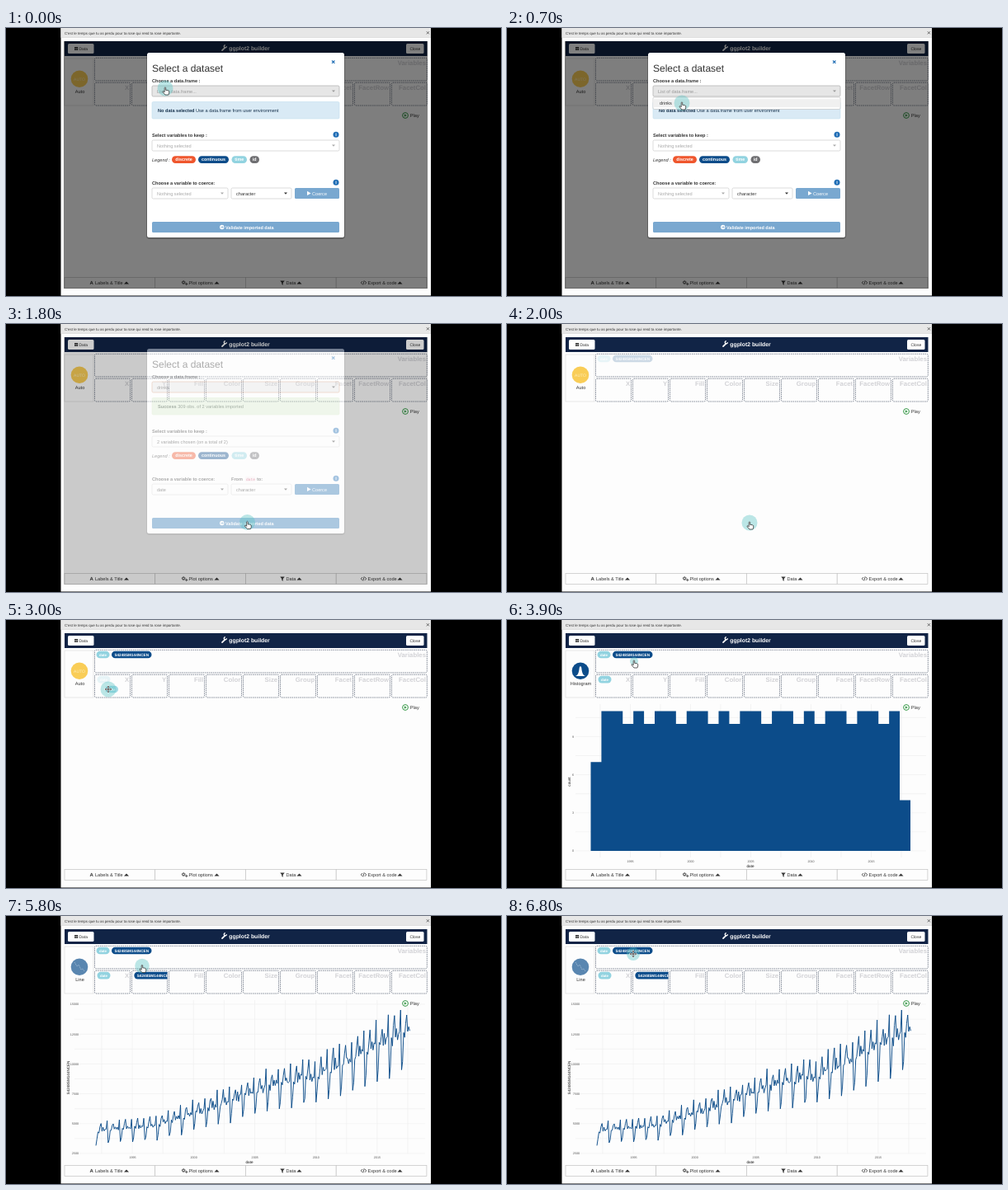
Recreate the animation shown at these times as an HTML page. Size 600 by 325 pixels, loop 6.9 s.

```html
<!DOCTYPE html>
<html lang="en">
<head>
<meta charset="utf-8">
<title>Chart builder</title>
<style>
html, body { margin: 0; width: 100%; height: 100%; overflow: hidden; background: #000; }
svg { display: block; width: 600px; height: 325px; }
text { font-family: "Liberation Sans", Arial, sans-serif; font-size: 5.6px; fill: #333; text-rendering: geometricPrecision; white-space: pre; }
</style>
</head>
<body>
<svg id="stage" viewBox="0 0 600 325" xmlns="http://www.w3.org/2000/svg"></svg>
<script>
const LOOP = 6900, STEP = 100;
const NAVY = '#0c4c8a', TEAL = '#92d3e0', BLUE = '#337ab7', HEADER = '#112446', PAPER = '#fdfdfd';
const SERIES = 'S4248SM144NCEN';

const rect = (x, y, w, h, fill, extra = '') =>
  `<rect x="${x}" y="${y}" width="${w}" height="${h}" fill="${fill}" ${extra}/>`;
const text = (x, y, s, extra = '') => `<text x="${x}" y="${y}" ${extra}>${s}</text>`;
const path = (d, fill, extra = '') => `<path d="${d}" fill="${fill}" ${extra}/>`;
const circle = (x, y, r, fill, extra = '') => `<circle cx="${x}" cy="${y}" r="${r}" fill="${fill}" ${extra}/>`;
const group = (id, body, extra = '') => `<g id="${id}" ${extra}>${body}</g>`;
const bold = 'font-weight="bold"', mid = 'text-anchor="middle"', end = 'text-anchor="end"';
const white = 'style="fill:#fff"';
const size = (px, fill = '#333') => `style="font-size:${px}px;fill:${fill}"`;

const pill = (x, y, w, label, fill, px = 4.7) =>
  rect(x, y, w, 8.6, fill, 'rx="4.3"') + text(x + w / 2, y + 6, label, `${bold} ${mid} ${size(px, '#fff')}`);
const datePill = (x, y) => pill(x, y, 16, 'date', TEAL, 4.4);
const seriesPill = (x, y) => pill(x, y, 48.5, SERIES, NAVY);
const caret = (x, y, up, fill = '#333') =>
  path(up ? `M${x - 3} ${y + 1.5}h6l-3-3z` : `M${x - 2} ${y - 1}h4l-2 2.2z`, fill);
const select = (x, y, w, label, ink, fill = '#fff', border = '#ccc') =>
  rect(x, y, w, 13, fill, `stroke="${border}" stroke-width=".7" rx="1.5"`) +
  text(x + 6, y + 8.6, label, `style="fill:${ink}"`) + caret(x + w - 7, y + 6.5, false, ink);
const gear = (x, y, r) => circle(x, y, r, 'none', 'stroke="#333" stroke-width="1"') +
  circle(x, y, r + .7, 'none', 'stroke="#333" stroke-width=".6" stroke-dasharray=".8 .9"');

function page() {
  const zones = ['X', 'Y', 'Fill', 'Color', 'Size', 'Group', 'Facet', 'FacetRow', 'FacetCol'];
  const dash = 'stroke="#6b7484" stroke-width=".8" stroke-dasharray="1.6 .9" rx="1.5"';
  const zone = (x, y, w, h, label) => rect(x, y, w, h, PAPER, dash) +
    text(x + w - 1.3, y + 8.4, label, `${bold} ${end} ${size(7.8, '#d2d2d6')}`);
  const tabs = [71, 180.7, 290.5, 400.2].map(x =>
    rect(x, 302.4, 109.7, 13, PAPER, 'stroke="#c4c4c4" stroke-width=".7"')).join('');
  return rect(66.5, 0, 448.5, 324.5, PAPER) +
    rect(66.5, 0, 448.5, 11.5, '#e7e7e7') + rect(66.5, 11.3, 448.5, .5, '#ccc') +
    text(71, 8, 'C\'est le temps que tu as perdu pour ta rose qui rend ta rose importante.', size(4.46)) +
    path('M509.8 4.2l3.2 3.2m0-3.2l-3.2 3.2', 'none', 'stroke="#333" stroke-width=".7"') +
    rect(71, 16, 439.5, 18, HEADER) +
    rect(75, 19, 31.5, 12, '#fff', 'rx="1.5"') + rect(485, 19, 21.5, 12, '#fff', 'rx="1.5"') +
    rect(83, 23, 4.2, 4, '#333') + path('M83 24.5h4.2m-4.2 1.3h4.2m-2.1-1.8v3', 'none', 'stroke="#fff" stroke-width=".3"') +
    text(88.5, 27, 'Data', size(5)) + text(495.8, 27, 'Close', `${mid} ${size(5)}`) +
    path('M262 27.2l3.6-3.6', 'none', 'stroke="#fff" stroke-width="1.7" stroke-linecap="round"') +
    path('M267.4 22.2a1.6 1.6 0 1 1-1.6-1.5', 'none', 'stroke="#fff" stroke-width="1.3"') +
    text(270.3, 27, 'ggplot2 builder', `${bold} ${size(6.85, '#fff')}`) +
    rect(71, 37, 35, 57, PAPER, 'stroke="#ddd" stroke-width=".7"') +
    zone(107.5, 36.3, 402.8, 27.6, 'Variables') +
    zones.map((z, i) => zone(107.5 + i * 45, 66.2, i === 8 ? 42.8 : 43, 27.8, z)).join('') +
    tabs +
    text(101.5, 311, 'A', `${bold} ${size(6)}`) + text(108, 311, 'Labels &amp; Title') + caret(146, 309, true) +
    gear(215.2, 308.5, 1.4) + gear(218.7, 310.4, .6) + text(221.5, 311, 'Plot options') + caret(255.5, 309, true) +
    path('M332.3 306.5h5.4l-2 2.6v2.6l-1.4-1v-1.6z', '#333') + text(339.5, 311, 'Data') + caret(355.5, 309, true) +
    path('M432 307l-1.7 1.9l1.7 1.9m3-3.8l1.7 1.9l-1.7 1.9m-.8-4.6l-1.4 5.2', 'none', 'stroke="#333" stroke-width=".8"') +
    text(438.5, 311, 'Export &amp; code') + caret(477.5, 309, true);
}

function chartIcons() {
  const label = s => text(89.5, 79.3, s, mid);
  return group('iconAuto', circle(89, 61.7, 10.3, '#f9cd57') + text(89, 63.7, 'AUTO', `${mid} ${size(5, '#fdeebf')}`) + label('Auto')) +
    group('iconHist', circle(89, 61.7, 10.3, NAVY) + path('M82.8 68c4-1 4.4-6 5-10.5q1.2-3 2.4 0c.6 4.5 1 9.5 5 10.5z', '#fff') + label('Histogram')) +
    group('iconLine', circle(89, 61.7, 10.3, '#5986b0') +
      path('M83 56l3 5l2-2l3 6l2-1l2 3', 'none', 'stroke="#a9c2d8" stroke-width=".7" stroke-dasharray="1.4 .6"') + label('Line'));
}

function grid(xs, ys, top, bottom, yearTick, yLabel) {
  const lines = xs.map(x => `M${x} ${top}V${bottom}`).join('') + ys.map(y => `M83 ${y}H508`).join('');
  return rect(72, 96, 437, 204, PAPER) + path(lines, 'none', 'stroke="#ededed" stroke-width=".6"') +
    [1995, 2000, 2005, 2010, 2015].map((y, i) => text(yearTick(i), 293.8, y, `${mid} ${size(3.7, '#555')}`)).join('') +
    text(295, 299.5, 'date', `${mid} ${size(4.6, '#111')}`) +
    text(0, 0, yLabel, `${mid} ${size(4.6, '#111')} transform="translate(76.5 196) rotate(-90)"`);
}
const spread = (start, gap, n) => Array.from({ length: n }, (_, i) => start + i * gap);

function histogram() {
  const unit = 15.4, width = 387.5 / 30, dips = [3, 5, 8, 11, 13, 16, 19, 21, 24, 27];
  const count = i => i === 0 ? 7 : i === 29 ? 4 : dips.includes(i) ? 10 : 11;
  let d = 'M101.5 280';
  for (let i = 0; i < 30; i++) d += `V${280 - count(i) * unit}H${101.5 + (i + 1) * width}`;
  return grid(spread(113, 36.5, 11), spread(280, -23.1, 8), 102, 288, i => 149.5 + i * 73, 'count') +
    [0, 3, 6, 9].map(v => text(81, 281.3 - v * unit, v, `${end} ${size(3.7, '#555')}`)).join('') +
    path(d + 'V280z', NAVY);
}

function lineChart() {
  const season = [.75, .83, 1, .98, 1.07, 1.14, 1, 1.05, .98, 1.02, 1.01, 1.17];
  const trend = [[1992, 4350], [1997, 4850], [2001, 6200], [2007, 8350], [2010, 9000], [2015, 11400], [2018, 12900]];
  let seed = 7;
  const noise = () => (seed = seed * 16807 % 2147483647) / 2147483647 - .5;
  let d = '';
  for (let m = 0; m < 309; m++) {
    const v = sample(trend, 1992 + m / 12)[0] * season[m % 12] * (1 + noise() * .06);
    d += `${m ? 'L' : 'M'}${(109 + m * 14.82 / 12).toFixed(1)} ${(288 - (v - 2500) * .01448).toFixed(1)}`;
  }
  return grid(spread(116, 37.1, 11), spread(288, -18.1, 11), 102, 288, i => 153.5 + i * 74.1, SERIES) +
    spread(2500, 2500, 6).map((v, i) => text(88, 289.3 - i * 36.2, v, `${end} ${size(3.7, '#555')}`)).join('') +
    path(d, 'none', `stroke="${NAVY}" stroke-width=".95" stroke-linejoin="round"`);
}

function modal() {
  const title = (y, s) => text(177, y, s, bold);
  const info = y => circle(400, y, 3.5, '#1f6db5') + text(400, y + 2, 'i', `${bold} ${mid} ${white}`);
  const buttons = rect(350, 194, 54, 13, BLUE, 'rx="1.5"') + path('M365 197.7v5.4l4.6-2.7z', '#fff') +
    text(371, 202.6, 'Coerce', white) + rect(177, 235, 227, 13, BLUE, 'rx="1.5"') +
    circle(261.8, 241.5, 2.7, '#fff') + path('M260.2 241.5h3m-1.2-1.3l1.3 1.3l-1.3 1.3', 'none', `stroke="${BLUE}" stroke-width=".7"`) +
    text(266, 243.6, 'Validate imported data', `${bold} ${size(5.5, '#fff')}`);
  const alert = (fill, border, ink, strong, rest) =>
    rect(177, 89.5, 227, 20.5, fill, `stroke="${border}" stroke-width=".6" rx="1.5"`) +
    `<text x="184" y="102" style="fill:${ink}"><tspan ${bold}>${strong}</tspan> ${rest}</text>`;
  return rect(170, 30, 241, 226, '#000', 'opacity=".25" rx="4"') + rect(171, 30, 239, 224, '#fff', 'rx="2.5"') +
    path('M395 39.5l3.4 3.4m0-3.4l-3.4 3.4', 'none', 'stroke="#1f6db5" stroke-width="1.1"') +
    text(177, 53, 'Select a dataset', size(12)) + title(65.5, 'Choose a data.frame :') +
    title(132, 'Select variables to keep :') + title(190, 'Choose a variable to coerce:') + info(129.3) + info(187.2) +
    text(177, 161.8, 'Legend :', 'font-style="italic"') +
    pill(201, 155.3, 29, 'discrete', '#ef562d', 5.4) + pill(233, 155.3, 37, 'continuous', NAVY, 5.4) +
    pill(273.5, 155.3, 18.5, 'time', TEAL, 5.4) + pill(295.5, 155.3, 11.5, 'id', '#6f6f72', 5.4) +
    select(273, 194, 73, 'character', '#333') + group('buttons', buttons) +
    group('empty', select(177, 70, 227, 'List of data.frame...', '#999', '#e6e6e6', '#adadad') +
      alert('#d9eaf5', '#c3dfee', '#17324d', 'No data selected', 'Use a data.frame from user environment') +
      select(177, 136, 227, 'Nothing selected', '#aaa') + select(177, 194, 92, 'Nothing selected', '#aaa')) +
    group('loaded', select(177, 70, 227, 'drinks', '#333', '#e6e6e6', '#d08a63') +
      alert('#dcedd2', '#d0e6c0', '#243f24', 'Success', '309 obs. of 2 variables imported') +
      select(177, 136, 227, '2 variables chosen (on a total of 2)', '#333') + select(177, 194, 92, 'date', '#333') +
      text(273, 190, 'From', bold) + rect(290, 184.8, 12.5, 6.8, '#f9f2f4', 'rx="1"') +
      `<text x="291" y="190" style="font-family:'Liberation Mono',monospace;font-size:4.6px;fill:#c7254e">date</text>` +
      text(304, 190, 'to:', bold)) +
    group('menu', rect(177, 84, 227, 14.5, '#fff', 'stroke="#bbb" stroke-width=".6" rx="1.5"') +
      rect(177.4, 86.2, 226, 10, '#f0f0f0') + text(185, 93, 'drinks'));
}

function pointer() {
  const hand = 'M-1 6l-2.8-3.2q-.4-1.5 1-1l1 1v-5.4q.8-1.3 1.5 0v3q3-.2 4 1.2v2.4l-.8 2z';
  const cross = 'M-3.6 0h7.2M0-3.6v7.2M-1-2.5l1-1.2l1 1.2M-1 2.5l1 1.2l1-1.2M-2.5-1l-1.2 1l1.2 1M2.5-1l1.2 1l-1.2 1';
  return circle(0, 0, 9.5, '#58c4c4', 'id="halo" opacity=".4"') +
    group('hand', path(hand, '#fff', 'stroke="#222" stroke-width=".7" transform="translate(1 2)"')) +
    group('cross', path(cross, 'none', 'stroke="#fff" stroke-width="1.8"') + path(cross, 'none', 'stroke="#222" stroke-width=".8"'));
}

// Linear interpolation through rows of [key, ...values].
function sample(rows, at) {
  const i = rows.findIndex(r => r[0] > at);
  if (i < 0) return rows[rows.length - 1].slice(1);
  const a = rows[i - 1], b = rows[i], k = (at - a[0]) / (b[0] - a[0]);
  return a.slice(1).map((v, j) => v + (b[j + 1] - v) * k);
}

const moves = [
  [0, 193, 73], [200, 193, 73], [500, 206, 84], [700, 212, 91], [900, 215, 91], [1300, 234, 57],
  [1600, 291, 240], [2000, 294, 241], [2300, 226, 248], [2700, 117, 46], [2800, 116, 44],
  [3000, 124, 84], [3200, 124, 84], [3800, 154, 51], [3900, 154, 50], [4200, 156, 41],
  [4400, 153, 42], [4700, 153, 43], [5300, 172, 79], [5600, 172, 79], [6000, 158, 42],
  [6300, 147, 45], [6700, 146, 45], [6800, 153, 46]
];
const halos = [[0, 9.5], [3000, 9.5], [3900, 5], [4700, 8.5], [5300, 8], [6000, 9], [6800, 8]];

document.getElementById('stage').innerHTML =
  `<clipPath id="clipY"><rect x="152" y="66" width="43.5" height="28"/></clipPath>` +
  page() + chartIcons() + group('hist', histogram()) + group('line', lineChart()) +
  circle(484, 106, 3.4, '#fff', 'stroke="#3a9a4a" stroke-width="1"') + path('M482.8 104.2v3.6l3-1.8z', '#3a9a4a') + text(489.8, 108, 'Play') +
  group('vars', datePill(109.5, 37.7) + seriesPill(128, 37.7)) +
  group('dropX', datePill(110.5, 67.8)) +
  group('dropY', seriesPill(155.3, 67.8), 'clip-path="url(#clipY)"') +
  group('dragX', datePill(-5, -4.3)) +
  group('dragY', seriesPill(-24.25, -4.3)) +
  group('dialog', rect(70, 16, 441, 300, '#000', 'opacity=".5"') + modal()) +
  group('cursor', pointer());

const el = id => document.getElementById(id);
const show = (id, alpha) => el(id).setAttribute('opacity', +alpha);
const place = (id, x, y, scale = 1) => el(id).setAttribute('transform', `translate(${x} ${y}) scale(${scale})`);

function render(t) {
  const within = (a, b) => t >= a && t < b;
  const [x, y] = sample(moves, t);

  show('dialog', t < 1800 ? 1 : t < 1900 ? .4 : 0);
  show('menu', within(400, 900));
  show('empty', t < 900);
  show('loaded', t >= 900);
  show('buttons', t < 1000 ? .65 : 1);

  show('vars', t < 2000 ? 0 : t < 2100 ? .2 : 1);
  show('dropX', t < 3000 ? 0 : t < 3200 ? .2 : 1);
  show('dropY', t < 5200 ? 0 : t < 5400 ? .45 : 1);
  show('dragX', within(2900, 3200) && .85);
  show('dragY', within(4800, 5400) && .8);
  place('dragX', x + 1, y);
  place('dragY', x + 4.5, y + 2, 1.15);

  show('iconAuto', t < 3500);
  show('iconHist', within(3500, 5700));
  show('iconLine', t >= 5700);
  show('hist', within(3900, 5700));
  show('line', t >= 5700);

  const moving = within(2800, 3200) || within(4700, 5700) || t >= 6300;
  show('hand', !moving);
  show('cross', moving);
  el('halo').setAttribute('r', sample(halos, t)[0]);
  place('cursor', x, y);
}

const start = performance.now();
function tick() {
  const t = (performance.now() - start) % LOOP;
  render(Math.floor(t / STEP) * STEP);
  requestAnimationFrame(tick);
}
render(0);
requestAnimationFrame(tick);
</script>
</body>
</html>
```
